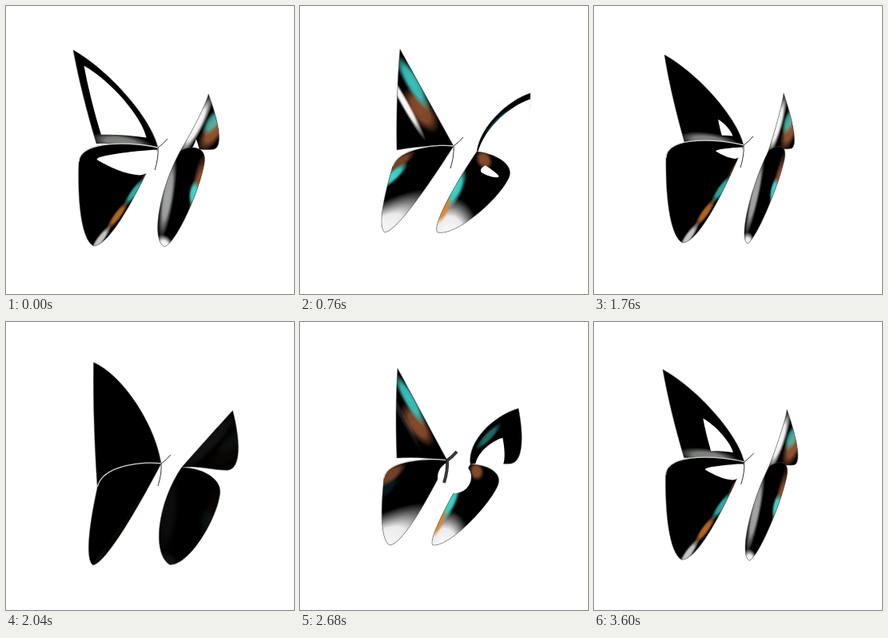
An HTML page with a canvas for the animation above (3.64 s loop, 360 by 360 pixels).

```html
<!DOCTYPE html>
<html lang="en">
<head>
<meta charset="utf-8">
<title>Butterfly</title>
<style>
  html, body { margin: 0; width: 100%; height: 100%; overflow: hidden; background: #fff; }
  canvas { display: block; width: 360px; height: 360px; }
</style>
</head>
<body>
<canvas id="stage" width="360" height="360"></canvas>
<script>
const ctx = document.getElementById('stage').getContext('2d');
const LOOP = 3640, FLAP = LOOP / 2, STEP = 40;
const KEYS = [0, 500, 760, 860, 1160, 1760];
const WHITE = '255,255,255', GREY = '165,168,165', CYAN = '64,214,206', TEAL = '44,112,122',
  ORANGE = '226,130,44', BROWN = '150,84,50', PURPLE = '176,64,190';

// A track holds one x y pair for each key time.
const track = s => s.match(/\d+ \d+/g).map(p => p.split(' ').map(Number));
const leftHinge = track('190 177, 197 176, 192 175, 184 173, 186 172, 187 174');
const rightHinge = track('218 181, 221 183, 221 182, 213 178, 186 182, 218 181');

// Periodic smooth interpolation along a track.
function follow(list, t) {
  const n = KEYS.length;
  const time = j => KEYS[(j + n) % n] + Math.floor(j / n) * FLAP;
  const at = j => list[(j + n) % n];
  let i = n - 1;
  while (KEYS[i] > t) i--;
  const span = time(i + 1) - time(i), k = (t - time(i)) / span;
  const ease = k * k * (3 - 2 * k);
  return at(i).map((a, d) => {
    const b = at(i + 1)[d];
    const ma = (b - at(i - 1)[d]) / (time(i + 1) - time(i - 1)) * span;
    const mb = (at(i + 2)[d] - a) / (time(i + 2) - time(i)) * span;
    return a + (b - a) * ease + k * (1 - k) * ((1 - k) * ma - k * mb);
  });
}

// Triangular pulse around a moment of the flap.
function pulse(t, peak, width) {
  const d = Math.abs((t - peak + 1.5 * FLAP) % FLAP - FLAP / 2);
  return Math.max(0, 1 - d / width);
}
const soft = x => Math.min(1, 1.15 * x * x * (3 - 2 * x));

// Wing space: hinge is 0 0, tip is 1 0, corner is 0 1. `shape` gives the controls of the three sides.
const wings = [
  {
    hinge: rightHinge,
    tip: track('253 110, 311 111, 288 109, 273 108, 208 98, 237 109'),
    corner: track('260 179, 290 191, 266 183, 264 177, 206 156, 247 178'),
    shape(cup) {
      const bow = 2.1 - 2.4 * cup;
      return [.43, -.28 * bow, .88, -.22 * bow, .53, .68, .04, 1.26, -.02, .67, .06, .27];
    },
    paint(glow, m) {
      glow(BROWN, .35, .7, .4, .35, m.open);
      glow(CYAN, .5, .55, .25, .25, m.open * .7);
      glow(WHITE, .45, .1, .55, .24, m.open);
      glow(WHITE, .55, -.2, .65, .3, m.wide);
      glow(CYAN, .5, -.15, .25, .15, m.fold * .5);
      glow(WHITE, .4, .1, .8, .5, m.shut);
      glow(TEAL, .4, .7, .6, .4, m.shut);
    },
    holes(hole, t) {
      const s = Math.min(1, 1.3 * pulse(t, 720, 250)), small = .5 * pulse(t, 20, 100);
      hole(-.1, .35 - .2 * s, s, s);
      hole(-.2, .3, small, small);
    }
  },
  {
    hinge: rightHinge,
    tip: track('248 196, 284 232, 261 215, 247 205, 184 212, 238 192'),
    corner: track('198 301, 205 302, 172 283, 166 279, 140 277, 192 297'),
    shape(cup) {
      const bow = .4 * cup * cup;
      return [.35, -.1, .99, -.18, 1, .28, .45, .9, -.2 - bow, 1, -.14 - bow, .45];
    },
    paint(glow, m) {
      glow(BROWN, .95, .35, .3, .45, m.open);
      glow(CYAN, .8, .35, .22, .14, m.open);
      glow(GREY, -.2, .5, .26, .45, m.open + m.wide);
      glow(WHITE, 0, 1, .4, .12, m.open + m.wide);
      glow(BROWN, .25, .02, .25, .1, m.fold * .9);
      glow(CYAN, -.08, .48, .2, .25, m.fold);
      glow(WHITE, .3, .95, .8, .42, m.fold);
      glow(ORANGE, -.1, .75, .12, .18, m.fold * .9);
      glow(TEAL, .2, .5, .8, .4, m.shut);
    },
    holes(hole, t) {
      const s = pulse(t, 760, 80);
      hole(.34, .06, .42 * s, .09 * s);
    }
  },
  {
    hinge: leftHinge,
    tip: track('84 55, 138 48, 125 54, 122 58, 131 75, 88 61'),
    corner: track('113 172, 118 262, 121 180, 121 170, 138 166, 113 170'),
    shape(cup) {
      const bow = .32 * cup * cup;
      return [.31, -bow, .8, -bow, .7, .33, .36, .67, .02, .67, .02, .33];
    },
    paint(glow, m) {
      glow(GREY, .03, .55, .1, .5, m.open * .8);
      glow(TEAL, .55, .28, .5, .3, m.wide);
      glow(CYAN, .58, .02, .42, .06, m.wide * .9);
      glow(BROWN, .22, .03, .2, .14, m.wide);
      glow(BROWN, .38, .22, .24, .24, m.fold * .9);
      glow(CYAN, .66, .1, .3, .15, m.fold * .9);
      glow(WHITE, .47, .43, .4, .08, m.flash);
    },
    holes(hole, t) {
      const s = pulse(t, 20, 100) * .92;
      hole(.1, .05, s, s);
    }
  },
  {
    hinge: leftHinge,
    tip: track('91 195, 138 215, 116 200, 105 195, 114 185, 90 190'),
    corner: track('109 300, 108 304, 106 283, 112 279, 140 277, 110 296'),
    shape: () => [.33, -.1, 1.21, -.27, .68, .41, .26, .88, -.25, 1.04, -.13, .44],
    paint(glow, m) {
      [BROWN, CYAN, ORANGE, WHITE].forEach((c, i) => glow(c, -.1 + .02 * i, .22 + .24 * i, .07, .15, m.open * .8));
      glow(BROWN, -.12, .32, .2, .25, m.wide);
      glow(CYAN, .2, .36, .22, .28, m.wide);
      glow(PURPLE, .04, .68, .2, .1, m.wide);
      glow(ORANGE, .03, .87, .15, .14, m.wide);
      glow(BROWN, .92, -.02, .22, .15, m.fold * .8);
      glow(CYAN, .82, .16, .18, .16, m.flash);
      glow(WHITE, .3, 1, 1, .52, m.fold);
      glow(TEAL, .3, .85, .3, .2, m.shut * .7);
    },
    holes(hole, t) {
      const s = pulse(t, 20, 130) * .88;
      hole(0, .02, s, .35 * s);
    },
    ribbed: true
  }
];

function drawWing(wing, t, moods) {
  const cup = (1 + Math.cos(t / FLAP * 2 * Math.PI)) / 2;
  const [hx, hy] = follow(wing.hinge, t), [tx, ty] = follow(wing.tip, t), [cx, cy] = follow(wing.corner, t);
  const ux = tx - hx, uy = ty - hy, vx = cx - hx, vy = cy - hy;
  const sides = wing.shape(cup);
  const place = (a, b) => [hx + a * ux + b * vx, hy + a * uy + b * vy];

  function outline(a = 0, b = 0, sa = 1, sb = 1) {
    const path = new Path2D(), at = (p, q) => place(a + p * sa, b + q * sb);
    const ends = [at(1, 0), at(0, 1), at(0, 0)];
    path.moveTo(...ends[2]);
    ends.forEach((end, i) => {
      const [p, q, r, s] = sides.slice(4 * i);
      path.bezierCurveTo(...at(p, q), ...at(r, s), ...end);
    });
    return path;
  }

  function glow(color, a, b, ra, rb, alpha) {
    if (alpha <= 0) return;
    ctx.save();
    ctx.transform(ux, uy, vx, vy, hx, hy);
    ctx.translate(a, b);
    ctx.scale(ra, rb);
    const g = ctx.createRadialGradient(0, 0, 0, 0, 0, 1);
    g.addColorStop(0, `rgba(${color},${alpha})`);
    g.addColorStop(.5, `rgba(${color},${alpha * .92})`);
    g.addColorStop(1, `rgba(${color},0)`);
    ctx.fillStyle = g;
    ctx.fillRect(-1, -1, 2, 2);
    ctx.restore();
  }

  function hole(a, b, sa, sb) {
    if (sa <= 0) return;
    ctx.fillStyle = '#fff';
    ctx.fill(outline(a, b, sa, sb));
  }

  const path = outline();
  ctx.fillStyle = '#000';
  ctx.fill(path);
  ctx.save();
  ctx.clip(path);
  if (wing.ribbed && moods.shut) {
    ctx.lineWidth = .9;
    for (let k = .42; k < 1; k += .035) {
      ctx.strokeStyle = `rgba(${150 - 90 * k},${80 + 45 * k},${60 + 70 * k},${k * k * moods.shut})`;
      ctx.stroke(outline(0, 0, k, k));
    }
  }
  wing.paint(glow, moods);
  ctx.restore();
  ctx.strokeStyle = 'rgba(80,80,80,.7)';
  ctx.lineWidth = .7;
  ctx.stroke(path);
  wing.holes(hole, t);

  if (wing.ribbed) {
    ctx.strokeStyle = 'rgba(225,228,226,.9)';
    ctx.lineWidth = 1.3;
    ctx.beginPath();
    ctx.moveTo(hx, hy);
    ctx.bezierCurveTo(...place(sides[0], sides[1]), ...place(sides[2], sides[3]), tx, ty);
    ctx.stroke();
  }
}

function drawBody(t, shut) {
  const [x, y] = follow(leftHinge, t), glare = pulse(t, 860, 90);
  if (glare) {
    ctx.fillStyle = '#fff';
    ctx.beginPath();
    ctx.ellipse(x + 9, y + 21, 21 * glare, 20 * glare, 0, 0, 2 * Math.PI);
    ctx.fill();
  }
  ctx.strokeStyle = `rgba(20,20,20,${.85 * (1 - shut)})`;
  ctx.lineWidth = 1 + 3 * glare;
  ctx.beginPath();
  ctx.moveTo(x + 12, y - 11);
  ctx.quadraticCurveTo(x + 6, y - 4, x, y);
  ctx.quadraticCurveTo(x + 1, y + 12, x - 4, y + 28);
  ctx.stroke();
}

function draw(ms) {
  const t = ms % FLAP;
  const moods = {
    open: soft(pulse(t, 0, 260)),
    wide: soft(pulse(t, 500, 250)),
    fold: soft(pulse(t, 810, 240)),
    flash: soft(pulse(t, 740, 150)),
    shut: soft(pulse(t, 1160, 260))
  };
  ctx.fillStyle = '#fff';
  ctx.fillRect(0, 0, 360, 360);
  for (const wing of wings) drawWing(wing, t, moods);
  drawBody(t, moods.shut);
}

let start;
function tick(now) {
  start ??= now;
  draw(Math.floor((now - start) / STEP) * STEP % LOOP);
  requestAnimationFrame(tick);
}
draw(0);
requestAnimationFrame(tick);
</script>
</body>
</html>
```
